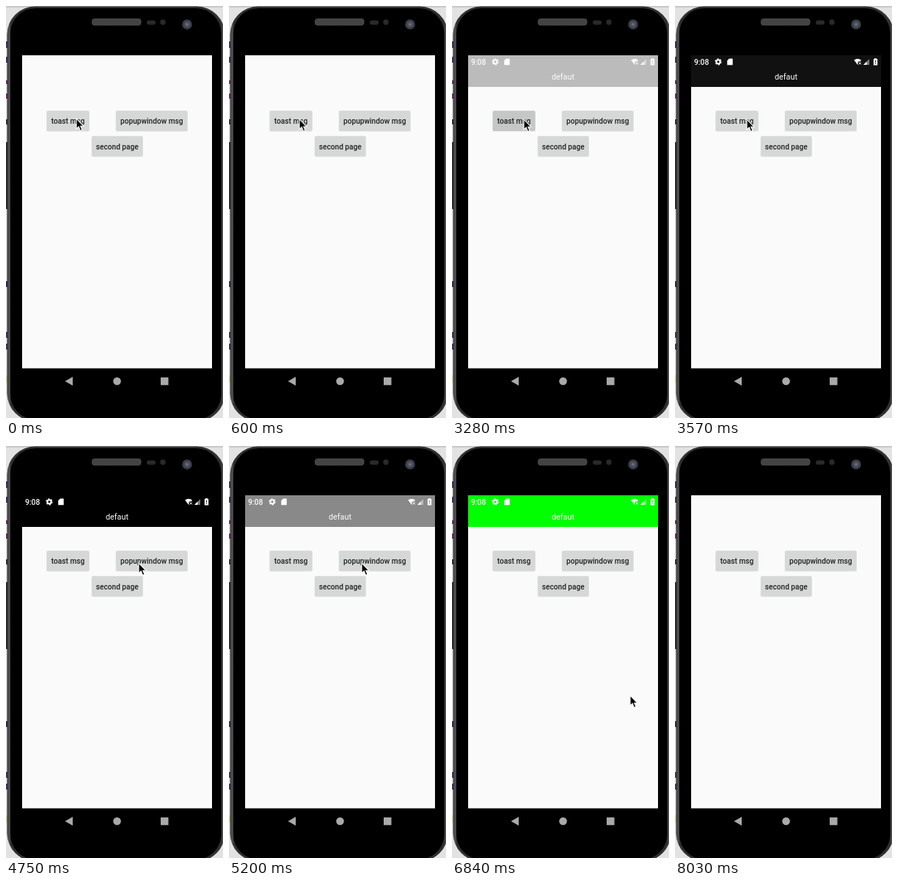
An HTML page that plays this animation: 296x560 px, repeating every 8820 ms.

```html
<!DOCTYPE html>
<html lang="en">
<head>
<meta charset="utf-8">
<title>Popup message demo</title>
<style>
  html, body { margin: 0; width: 100%; height: 100%; overflow: hidden; background: #e2e2e2; }
  svg { display: block; }
  text { font-family: Roboto, Arial, sans-serif; }
  .label { font-size: 10.15px; font-weight: 500; fill: #202020; text-anchor: middle; }
  .header { fill: #fff; opacity: 0; }
</style>
</head>
<body>
<svg width="296" height="560" viewBox="0 0 296 560">
  <defs>
    <linearGradient id="rim" x1="0" x2="1">
      <stop offset="0" stop-color="#262626"/>
      <stop offset=".008" stop-color="#5a5a5a"/>
      <stop offset=".016" stop-color="#303030"/>
      <stop offset=".984" stop-color="#303030"/>
      <stop offset=".992" stop-color="#5a5a5a"/>
      <stop offset="1" stop-color="#262626"/>
    </linearGradient>
    <pattern id="mesh" width="2" height="2" patternUnits="userSpaceOnUse">
      <rect width="2" height="2" fill="#2b2b2b"/>
      <path d="M0 2L2 0" stroke="#676767" stroke-width=".8"/>
    </pattern>
    <g id="status">
      <text x="26" y="79.6" font-size="10.3" font-weight="500">9:08</text>
      <circle cx="59" cy="75.8" r="2.6" fill="none" stroke="#fff" stroke-width="2"/>
      <circle cx="59" cy="75.8" r="4" fill="none" stroke="#fff" stroke-width="1.3" stroke-dasharray="2.1 2.09"/>
      <path d="M73.8 71.5H78.7V80.3H71.2V74.2Z"/>
      <path d="M244.2 73.6Q249 69.8 254 73.6L252.6 75.4H249.5V79.8H249Z"/>
      <path d="M250.8 76.5l3 3m0-3l-3 3" stroke="#fff"/>
      <path d="M257 80L265 72V80Z" opacity=".45"/>
      <path d="M257 80L261.5 75.5V80Z"/>
      <path fill-rule="evenodd" d="M272 71h3v1h1.2v8.6h-5.4V72H272zM273 74v2.6h1V74zM273 77.6v1.2h1v-1.2z"/>
      <text x="151.5" y="100" font-size="10.8" text-anchor="middle">defaut</text>
    </g>
  </defs>

  <rect width="296" height="560" fill="#e2e2e2"/>
  <rect width="296" height="2" fill="#c8c8c8"/>
  <g id="scraps"></g>
  <rect y="185" width="3" height="91" fill="#2c2c2c"/>
  <rect x="1.5" y=".5" width="297" height="564" rx="38" fill="url(#rim)"/>
  <rect x="6" y="3" width="287.5" height="559" rx="34"/>

  <rect x="117.5" y="17.5" width="66.500" height="8.500" rx="3" fill="url(#mesh)" stroke="#4a4a4a"/>
  <rect x="192" y="19.500" width="12" height="6" rx="3" fill="#292929"/>
  <circle cx="214" cy="22" r="3.700" fill="#292929"/>
  <circle cx="247" cy="25" r="6.800" fill="#3b3d43"/>
  <circle cx="247" cy="25" r="4" fill="#4c5261"/>
  <circle cx="247" cy="25" r="1.800" fill="#666f85"/>

  <rect x="22" y="67" width="259" height="425.500" fill="#fafafa"/>
  <g id="buttons"></g>

  <g id="black" class="header"><rect x="22" y="67" width="259" height="43" fill="#000"/><use href="#status"/></g>
  <g id="green" class="header"><rect x="22" y="67" width="259" height="43" fill="#0f0"/><use href="#status"/></g>

  <g fill="#a9a9a9">
    <path d="M80.500 510L91 504V516Z"/>
    <circle cx="151.500" cy="510" r="5.300"/>
    <rect x="211" y="504.800" width="10.500" height="10.500"/>
  </g>

  <path id="cursor" d="M1 1V15L4.200 12L6.500 17.600L9 16.500L6.700 11.300H11Z" fill="#000" stroke="#fff" stroke-width="1.100"/>
</svg>
<script>
const LOOP = 8820;
const $ = id => document.getElementById(id);

function add(parent, tag, attrs, text = '') {
  const el = document.createElementNS('http://www.w3.org/2000/svg', tag);
  for (const name in attrs) el.setAttribute(name, attrs[name]);
  el.textContent = text;
  return parent.appendChild(el);
}

// Bits of the desktop peeking out left of the phone: y, height, colour
[[48, 9, '#34406f'], [69, 8, '#34406f'], [101, 5, '#81267f'], [119, 7, '#81267f'],
 [154, 7, '#333'], [374, 8, '#27345f'], [443, 8, '#34406f'], [459, 8, '#34406f'], [502, 10, '#d8d5a0']]
  .forEach(([y, height, fill]) => add($('scraps'), 'rect', { y, height, width: 2, fill }));

function button(x, y, width, label, touch) {
  const box = { x, y, width, height: 27.5, rx: 2 };
  const clip = add($('buttons'), 'clipPath', { id: 'clip' + x });
  add(clip, 'rect', box);
  add($('buttons'), 'rect', { ...box, x: x - .5, y: y - .5, width: width + 1, height: 28.7, fill: '#e8e9e9' });
  add($('buttons'), 'rect', { ...box, fill: '#d6d7d7' });
  const holder = add($('buttons'), 'g', { 'clip-path': `url(#clip${x})` });
  const ripple = add(holder, 'circle', { cx: touch, cy: 157, r: 0, opacity: 0 });
  add($('buttons'), 'text', { class: 'label', x: x + width / 2, y: y + 17.6 }, label);
  return ripple;
}

const toast = button(55.5, 142.5, 58, 'toast msg', 95);
const popup = button(150, 142.5, 97.5, 'popupwindow msg', 181);
button(117, 177, 69.5, 'second page', 151);

// Each step is [time, ...values] and holds until the next one
function play(el, steps, toFrame) {
  const frames = steps.map(([t, ...v]) => ({ offset: t / LOOP, easing: 'step-end', ...toFrame(...v) }));
  frames.push({ ...frames[frames.length - 1], offset: 1 });
  el.animate(frames, { duration: LOOP, iterations: Infinity }).startTime = start;
}

const start = document.timeline.currentTime || 0;
const fade = opacity => ({ opacity });
const spread = (r, opacity) => ({ r: r + 'px', opacity });
const move = (x, y, opacity = 1) => ({ transform: `translate(${x}px, ${y}px)`, opacity });

play(toast, [[0, 0, 0], [2850, 27, .13], [2990, 50, .13], [3130, 60, .13],
  [3280, 60, .08], [3420, 60, .03], [3570, 60, 0]], spread);
play(popup, [[0, 0, 0], [5800, 30, .13], [5950, 75, .13], [6100, 75, .06], [6250, 75, 0]], spread);

play($('black'), [[0, 0], [3280, .25], [3420, .65], [3570, .93], [3720, 1],
  [5050, .8], [5200, .45], [5350, .15], [5500, 0]], fade);
play($('green'), [[0, 0], [5950, .35], [6100, .8], [6250, 1], [7880, .5], [8030, 0]], fade);

play($('cursor'), [[0, 95, 152], [600, 95, 152.6], [3280, 97, 153], [3720, 120, 152],
  [3860, 177, 151], [4000, 182, 153], [4450, 181, 155], [4600, 180, 157], [4750, 180, 158],
  [6840, 242, 338], [6990, 254, 398], [7440, 263, 460], [7590, 268, 542], [7880, 268, 560, 0]], move);
</script>
</body>
</html>
```
